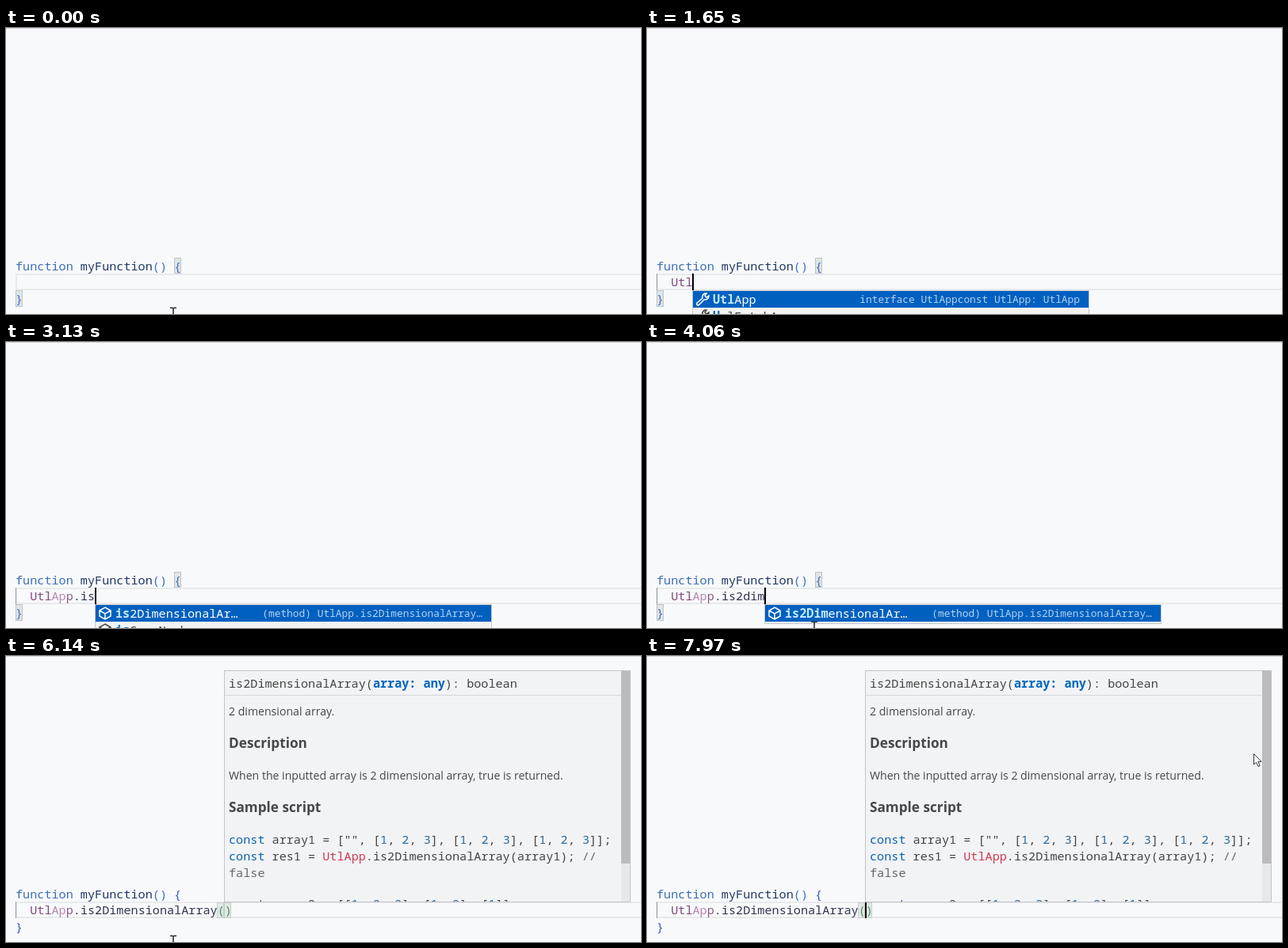
Animation, 801 px wide and 361 px high, one loop 8000 ms. Source, as an HTML page:

```html
<!DOCTYPE html>
<html lang="en">
<head>
<meta charset="utf-8">
<title>Editor autocomplete</title>
<style>
html, body { margin: 0; width: 100%; height: 100%; overflow: hidden; background: #f8f9fb; }
svg { display: block; }
text { white-space: pre; font-family: "Noto Sans Mono", monospace; }
.prose { font-family: "Open Sans", sans-serif; }
</style>
</head>
<body>
<svg id="stage" width="801" height="361" viewBox="0 0 801 361"></svg>
<script>
const LOOP = 8000, LEFT = 12, CHAR = 9.1, CODE = CHAR / 0.6, DETAIL = 12.87;
const stage = document.getElementById('stage');
const col = n => LEFT + n * CHAR;

const rect = (x, y, w, h, fill, extra = '') =>
  `<rect x="${x}" y="${y}" width="${w}" height="${h}" fill="${fill}" ${extra}/>`;
const frame = (x, y, w, h, fill, line) =>
  rect(x + .5, y + .5, w - 1, h - 1, fill, `stroke="${line}"`);
// Runs are [string, colour, weight].
const text = (x, y, size, runs, extra = '') =>
  `<text x="${x}" y="${y}" font-size="${size}" ${extra}>` + runs.map(([s, fill, weight = 400]) =>
    `<tspan fill="${fill}" font-weight="${weight}">${s}</tspan>`).join('') + '</text>';
const code = (x, y, ...runs) => text(x, y, CODE, runs);

const member = 'UtlApp.is2Dimensional';
const full = member + 'Array';
const uri = ['var', 'URIError', 1, 'interface URIErrorvar URIError: URIErrorC…', 'UiApp', 1];
const utilities = ['wrench', 'Utilities', 2, 'interface Utilitiesconst Utilities: U…', 'UtlApp', 2];
const app = n => ['wrench', 'UtlApp', n, 'interface UtlAppconst UtlApp: UtlApp', 'UrlFetchApp', 1];
const is2 = (n, next) => ['cube', 'is2DimensionalAr…', n, `(method) ${full}…`, next, 2];
const methods = ['cube', 'addQueryParamete…', 0, '(method) UtlApp.addQueryParameters(u…', 'blobToString', 0];

// Time, typed line, suggestion list.
const steps = [
  [0, ''], [650, '  '], [990, '  U'], [1050, '  U', uri], [1260, '  Ut', utilities],
  [1650, '  Utl', app(3)], [2050, '  UtlA', app(4)], [2250, '  UtlAp', app(5)],
  [2340, '  UtlApp', app(6)], [2540, '  UtlApp.'], [2610, '  UtlApp.', methods],
  [3070, '  UtlApp.i', is2(1, 'isSameNumber')], [3130, '  UtlApp.is', is2(2, 'isSameNumber')],
  [3400, '  UtlApp.is2', is2(3, 'isSameNumber')], [3800, '  UtlApp.is2d', is2(4)],
  [3860, '  UtlApp.is2di', is2(5)], [4060, '  UtlApp.is2dim', is2(6)],
  [4590, '  ' + full], [5660, '  ' + full + '(']
];
const caretFlips = [260, 5250, 5660, 6140, 6690, 7190, 7690];

const icons = {
  var: '<path d="M4 3H1V13H4M14 3H17V13H14M5 7L9 5L13 6.5V10L9 12L5 10ZM5 7L9 8.5L13 6.5M9 8.5V12"/>',
  wrench: '<path d="M2 13L9 7Q8 3 12 1L14 1L12 4L14 6L17 4Q17 9 11 9L4 16Q1 16 2 13Z"/>',
  cube: '<path d="M9 1L16 5V12L9 16L2 12V5ZM2 5L9 9L16 5M9 9V16"/>'
};
const icon = (name, x, y, stroke) =>
  `<g transform="translate(${x} ${y})" fill="none" stroke="${stroke}" stroke-width="1.5">${icons[name]}</g>`;

function popup(x, [kind, label, match, detail, next, nextMatch]) {
  const split = (s, n, hot, plain) => [[s.slice(0, n), hot, 700], [s.slice(n), plain]];
  let s = frame(x, 331, 501, next ? 60 : 25, '#f3f3f3', '#c4c8cc')
    + rect(x + 1, 332, 499, 21, '#0060c0')
    + icon(kind, x + 4, 334, '#fff')
    + text(x + 26, 348, CODE, split(label, match, '#c2e8ff', '#fff'))
    + text(x + 489, 347, DETAIL, [[detail, '#b3d2f0']], 'text-anchor="end"');
  if (next) s += icon(kind === 'cube' ? 'cube' : 'wrench', x + 4, 355, '#444')
    + text(x + 26, 369, CODE, split(next, nextMatch, '#0066bf', '#444'));
  if (kind === 'var' || label[0] === 'a') s += rect(x + 489, 353, 11, 8, '#dcdcde');
  return s;
}

function panel(thumb) {
  const ink = '#444', blue = '#0b62b0', num = '#2b6a98';
  const prose = (y, size, s, weight) => text(281, y, size, [[s, '#45474a', weight]], 'class="prose"');
  const nums = s => s.split(/(\d)/).map(p => [p, /\d/.test(p) ? num : ink]);
  const triple = '[1, 2, 3]';
  return frame(275, 18, 513, 293, '#f2f3f5', '#c2c4c8')
    + rect(276, 49, 500, 1, '#d5d6d9')
    + rect(776, 19, 11, 291, '#e7e8ea')
    + (thumb ? rect(776, 19, 11, 243, '#bbbbbd') : '')
    + code(281, 40, ['is2DimensionalArray(', ink], ['array: any', '#0066bf', 700], ['): boolean', ink])
    + prose(75, 14.1, '2 dimensional array.')
    + prose(116, 17.2, 'Description', 700)
    + prose(156, 14.1, 'When the inputted array is 2 dimensional array, true is returned.')
    + prose(197, 17.2, 'Sample script', 700)
    + code(281, 236.5, ['const', blue], [' array1 = ["", ', ink], ...nums(`${triple}, ${triple}, ${triple}];`))
    + code(281, 257.5, ['const', blue], [' res1 = ', ink], ['UtlApp', '#cf3a52'],
      ['.is2DimensionalArray(array1); ', ink], ['//', '#66686b'])
    + code(281, 278.5, ['false', '#66686b'])
    + '<clipPath id="fold"><path d="M276 300H776V310H276Z"/></clipPath><g clip-path="url(#fold)">'
    + code(281, 318, ['const', blue], [' array2 = ', ink], ...nums(`[${triple}, [1, 2], [1]];`)) + '</g>';
}

function mouse(t) {
  if (t < 6970) return [211, 352.5];
  const u = Math.min(1, Math.floor((t - 6970) / 66.6) / 15);
  const p = u < .5 ? 2 * u * u : 1 - 2 * (1 - u) ** 2;
  return [219 + 546 * p, 351 - 228 * p];
}

function pointer([x, y], arrow) {
  return `<g transform="translate(${x} ${y})">` + (arrow
    ? '<path d="M.5 .5V14L3.6 11.2L6 16.5L8.2 15.5L5.9 10.4H10Z" fill="#fff" stroke="#333"/>'
    : '<path d="M-4 .8H-1L0 1.6L1 .8H4M0 1.5V15M-4 16H4" fill="none" stroke="#30323c" stroke-width="1.6"/>') + '</g>';
}

function draw(t) {
  const [, line, list] = steps.findLast(s => s[0] <= t);
  const called = t >= 5660, hover = t >= 5800;
  const x = Math.floor(col(line.length));
  const pos = mouse(t), inside = pos[0] > 275 && pos[1] < 310;
  const brace = called ? '#3a52d4' : '#3d70bd';
  const box = (x, y, h) => frame(x, y, 9, h, '#e0e5e6', '#bfc4c6');

  let s = rect(0, 0, 801, 361, '#f8f9fb') + rect(0, 0, 801, 1, '#d3d5d8')
    + rect(13, 311, 800, 19, 'none', 'stroke="#e9eaec" stroke-width="2"');
  if (line) s += rect(12, 310, 1, 21, '#9a9da3');
  if (called) s += [28, 29].map(n => frame(Math.floor(col(n)), 311, 9, 20, '#dfeae2', '#c3d0c6')).join('');
  else s += box(212, 290, 20) + box(12, 331, 21);

  s += code(LEFT, 306, ['function ', '#3c6eb4'], ['myFunction', '#203864'], ['() ', '#3c72c4'], ['{', brace])
    + code(LEFT, 347, ['}', brace])
    + code(LEFT, 326, [line.slice(0, 5), '#80497d'], [line.slice(5, 7), '#b887b4'],
      [line.slice(7, 8), '#895c87'], [line.slice(8, 28), '#303650'], [called ? '()' : '', '#5b8a70']);
  if (caretFlips.filter(f => f <= t).length % 2) s += rect(x, 310, 2, 21, '#000');
  if (list) s += popup(x, list);
  if (hover) s += panel(t < 6550 || inside);
  if (!list || !list[4]) s += pointer(pos, inside);
  stage.innerHTML = s;
}

const start = performance.now();
function tick() {
  draw((performance.now() - start) % LOOP);
  requestAnimationFrame(tick);
}
tick();
</script>
</body>
</html>
```
